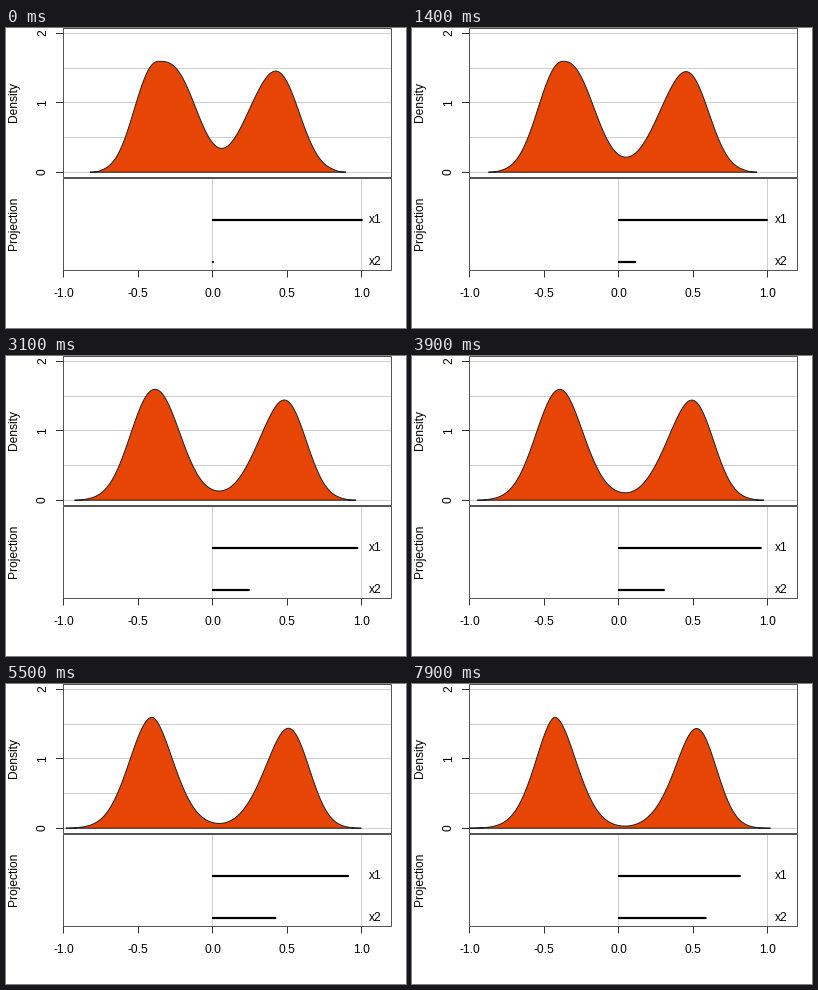
These frames come from a looping animation (400 by 300 pixels, 8 s). A matplotlib script:

```python
import matplotlib.pyplot as plt
import numpy as np
from matplotlib.animation import FuncAnimation
from matplotlib.patches import Polygon, Rectangle

FRAMES, INTERVAL = 80, 100
ANGLE_STEP = 0.00788
X0, X_UNIT = 206.8, 149
Y0, Y_UNIT = 144.2, 69.3
LEFT, RIGHT, MIDDLE, BOTTOM = 57.5, 385.5, 150.5, 242.5
PX = 0.72  # points per pixel at 100 dpi

plt.rcParams["font.family"] = "Liberation Sans"
plt.rcParams["font.size"] = 12 * PX

fig = plt.figure(figsize=(4, 3), dpi=100, facecolor="white")
ax = fig.add_axes([0, 0, 1, 1])
ax.set_xlim(0, 400)
ax.set_ylim(300, 0)
ax.axis("off")


def px(value):
    return X0 + X_UNIT * value


def py(value):
    return Y0 - Y_UNIT * value


def crisp(v):
    """Centre of the pixel that holds v."""
    return np.floor(v) + 0.5


def segment(xs, ys, color="#333333", width=1, **kw):
    return ax.plot(xs, ys, color=color, lw=width * PX, snap=False, **kw)[0]


def hline(x1, x2, y, *args, **kw):
    segment([x1, x2], [crisp(y)] * 2, *args, solid_capstyle="butt", **kw)


def vline(x, y1, y2, *args, **kw):
    segment([crisp(x)] * 2, [y1, y2], *args, solid_capstyle="butt", **kw)


def label(x, y, text, turned=False, ha="center"):
    ax.text(x, y, text, ha=ha, va="baseline", rotation=90 if turned else 0,
            rotation_mode="anchor", zorder=5)


def ease(start, mid, end):
    """Quadratic through the values at the start, frame 31 and the last frame."""
    return np.polyfit([0, 31, FRAMES - 1], [start, mid, end], 2)


def at(curves, n):
    return [np.polyval(c, n) for c in curves]


def bump(x, height, center, spread):
    return height * np.exp(-0.5 * ((x - center) / spread) ** 2)


def hump(x, center, half_l, pow_l, half_r, pow_r):
    """Lopsided bell: half width and steepness differ on each side."""
    half = np.where(x < center, half_l, half_r)
    power = np.where(x < center, pow_l, pow_r)
    return 1.6 * 0.5 ** ((np.abs(x - center) / half) ** power)


LEFT_HUMP = (ease(153, 149, 143),
             ease(27, 28, 23), ease(2.3, 2.1, 1.8),
             ease(39, 29, 25), ease(2.84, 2.05, 1.85))
# Height, centre and spread of each bump on the right.
RIGHT_BUMPS = [
    (ease(1.28, 1.28, 1.27), ease(275, 282.3, 287.3), ease(20, 19.5, 18.5)),
    (ease(0.53, 0.45, 0.33), ease(246, 253.8, 262.8), ease(18, 18.8, 20)),
    (ease(0.09, 0.04, 0), ease(213, 212, 211), ease(16, 16, 16)),
]
SPAN = ease(84, 68.5, 54), ease(340, 350, 358.5)


def outline(n):
    lo, hi = at(SPAN, n)
    x = np.linspace(lo, hi, 400)
    d = hump(x, *at(LEFT_HUMP, n))
    d += sum(bump(x, *at(b, n)) for b in RIGHT_BUMPS)
    d *= np.clip(np.minimum(x - lo, hi - x) / 12, 0, 1)
    return np.column_stack([x, py(d)])


# Grid
for v in (0, 0.5, 1, 1.5, 2):
    hline(LEFT, RIGHT, py(v), "#cfcfcf", zorder=1)
for v in (0, 1):
    vline(px(v), MIDDLE, BOTTOM, "#cfcfcf", zorder=1)

# Panels and axes
for top, bottom in ((0.5, MIDDLE - 1), (MIDDLE, BOTTOM)):
    ax.add_patch(Rectangle((LEFT, top), RIGHT - LEFT, bottom - top, fill=False,
                           ec="#555555", lw=PX, snap=False, zorder=4))
for v in (0, 1, 2):
    hline(50, LEFT, py(v), zorder=4)
    label(40, py(v) - 0.7, str(v), turned=True)
for v in (-1, -0.5, 0, 0.5, 1):
    vline(px(v), BOTTOM, 249.5, zorder=4)
    label(px(v), 269, f"{v:.1f}")
label(11.5, 73.7, "Density", turned=True)
label(11.5, 195.5, "Projection", turned=True)

# Moving parts
density = Polygon(outline(0), closed=True, fc="#e64506", ec="#222222",
                  lw=PX, zorder=3)
ax.add_patch(density)
density.set_clip_path(Rectangle((LEFT, 0), RIGHT - LEFT, 150,
                                transform=ax.transData))

bars = []
for name, y in (("x1", 192), ("x2", 234)):
    bars.append(segment([X0, X0], [y, y], "black", 2.2,
                        solid_capstyle="round", zorder=3))
    label(px(1.05), y + 3, name, ha="left")


def update(n):
    density.set_xy(outline(n))
    angle = ANGLE_STEP * n
    for bar, size in zip(bars, (np.cos(angle), np.sin(angle))):
        bar.set_xdata([X0, px(max(size, 0.001))])
    return [density, *bars]


anim = FuncAnimation(fig, update, frames=FRAMES, interval=INTERVAL,
                     repeat=True, repeat_delay=0)
plt.show()
```
